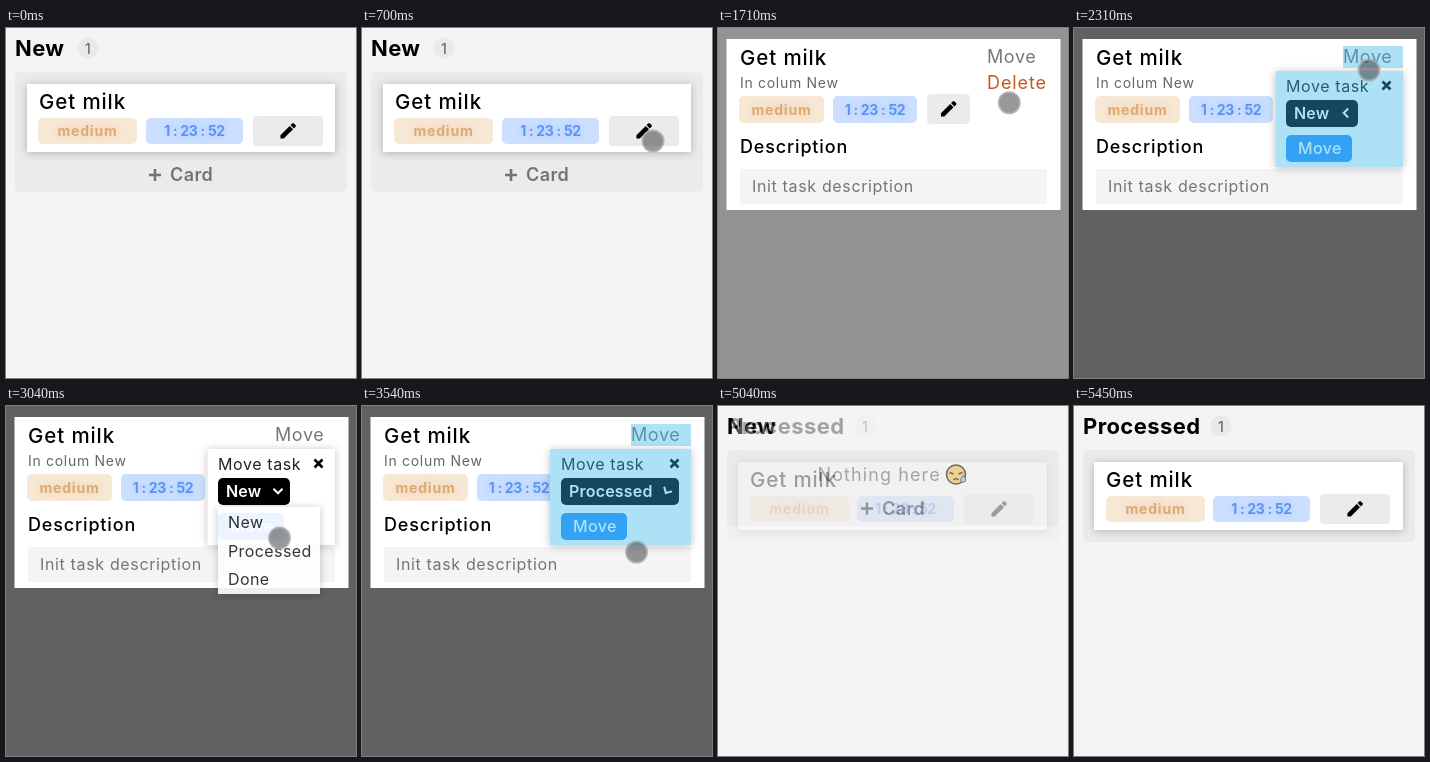
Write an HTML page that moves like this. It is 350 px wide and 350 px high and loops after 6170 ms.

```html
<!DOCTYPE html>
<html lang="en">
<head>
<meta charset="utf-8">
<title>Task board</title>
<style>
  html, body { margin: 0; height: 100%; overflow: hidden; background: #f4f4f4; }
  svg { display: block; width: 100vw; height: 100vh; font-family: Inter, sans-serif; }
  .raised { filter: drop-shadow(0 1px 4px rgba(0, 0, 0, .25)); }
  .glow { filter: drop-shadow(0 0 4px currentColor); }
</style>
</head>
<body>
<svg id="stage" viewBox="0 0 350 350"></svg>
<script>
const LOOP = 6170, STEP = 101, LEAD = 20;
const stage = document.getElementById('stage');
const TAP = 'rgba(51,181,229,.4)';

// Pointer path: step, x, y
const pointerPath = [
  [2, 301, 305], [5, 297, 150], [7, 291, 113], [13, 291, 113], [15, 290.5, 102.5],
  [19, 292, 47], [20, 298, 36], [21, 295, 42], [23, 295, 42], [28, 250, 86],
  [29, 256, 98], [30, 273.5, 132], [32, 274.5, 146], [35, 274.5, 146],
  [38, 240, 122], [40, 238, 122], [42, 249.5, 183.5]
];

const clamp = v => Math.max(0, Math.min(1, v));
const ramp = (k, from, to) => clamp((k - from) / (to - from));

const rect = (x, y, w, h, fill, r = 0, cls = '') =>
  `<rect x="${x}" y="${y}" width="${w}" height="${h}" rx="${r}" fill="${fill}" class="${cls}"/>`;
const text = (x, y, str, size, weight = 500, fill = '#000', spacing = 0, extra = '') =>
  `<text x="${x}" y="${y}" font-size="${size}" font-weight="${weight}" fill="${fill}"
    letter-spacing="${spacing}" ${extra}>${str}</text>`;
const line = (d, color, width, extra = '') =>
  `<path d="${d}" fill="none" stroke="${color}" stroke-width="${width}" ${extra}/>`;
const group = (body, attrs) => `<g ${attrs}>${body}</g>`;

const pill = (x, y, w, h, str, bg, ink, spacing) =>
  rect(x, y, w, h, bg, 5) +
  text(x + w / 2, y + h / 2 + 5, str, 14, 700, ink, spacing,
    `text-anchor="middle" class="glow" style="color:${ink}66"`);

const pencil = (x, y) => group(
  '<path d="M3 21v-4L14 6l4 4L7 21zM15 5l2-2q1-1 2 0l2 2q1 1 0 2l-2 2z"/>',
  `transform="translate(${x} ${y}) scale(.84) translate(-12 -12)"`);

const badges = (x1, w1, x2, w2, x3, w3, y, h) =>
  pill(x1, y, w1, h, 'medium', '#f7e7d5', '#dfa970', .8) +
  pill(x2, y, w2, h, '1 : 23 : 52', '#ccdfff', '#5a94f5', -.3) +
  rect(x3, y - 2, w3, 30, '#ebebeb', 4) + pencil(x3 + w3 / 2, y + 13);

const taskName = (x, y) => text(x, y, 'Get milk', 20.5, 500, '#000', .9);

const heading = (name, badgeX) => text(9, 28, name, 22, 700, '#000', .4) + (badgeX
  ? `<circle cx="${badgeX}" cy="20" r="10.5" fill="#e9e9e9"/>` +
    text(badgeX, 25.5, 1, 14, 500, '#706a70', 0, 'text-anchor="middle"')
  : '');

const panel = h => rect(9, 44, 332, h, '#ebebeb', 5);
const card = x => rect(x, 56, 329 - x, 68, '#fff', 0, 'raised') + taskName(x + 12, 81) +
  badges(32, 99, x + 119, 97, x + 226, 70, 90, 26);
const addCard = y => line(`M143 ${y}h12m-6-6v12`, '#7a716e', 2.6) +
  text(164, y + 6, 'Card', 18, 600, '#7a716e', .4);

const sleepyFace = `
  <circle cx="238" cy="68.500" r="9.500" fill="#e6b95a" stroke="#222" stroke-width="1.600"/>
  <path d="M231.500 66.500l4 1.500m5 0l4-1.500M235.500 74q2.500-3 5 0" fill="none" stroke="#222" stroke-width="1.400"/>
  <path d="M245 69.500q-3.500 4-2 6t4.500 0q1.500-2.500-2.500-6z" fill="#82c3e5" stroke="#222" stroke-width=".8"/>`;

const fullBoard = () => heading('New', 82) + panel(120) + card(21) + addCard(147);
const emptyBoard = () => heading('New') + panel(76) +
  text(99.5, 75, 'Nothing here', 18, 400, '#777', 1.1) + sleepyFace + addCard(102.5);
const processedBoard = () => rect(0, 0, 350, 350, '#f4f4f4') +
  heading('Processed', 147) + panel(92) + card(20);

const modal = () => rect(8.5, 11, 334, 171, '#fff') + taskName(22, 37) +
  text(22, 60, 'In colum New', 14, 400, '#666', .7) +
  badges(21, 85, 115, 84, 209, 43, 68, 27) +
  text(22, 125, 'Description', 18, 500, '#000', .85) +
  rect(22, 141, 307, 35, '#f4f4f4') +
  text(34, 164, 'Init task description', 16, 400, '#757575', .65) +
  text(269, 35, 'Move', 18, 400, '#777', .6) +
  text(269, 61, 'Delete', 18, 400, '#c8561f', .9);

function popup(k) {
  const chosen = k >= 35;
  const x = chosen ? 188 : 201.5, left = Math.floor(x + 11.5) - 1 + (chosen ? 1 : 0);
  const selectW = chosen ? 118 : 72;
  const angle = chosen ? 30 + 60 * ramp(k, 35, 36) : 90 * (1 - ramp(k, 28, 30));
  const tap = chosen ? 1 - ramp(k, 35, 37) : 1 - ramp(k, 24, 26);
  return rect(x, 43, 329 - x, 96, '#fff', 0, 'raised') +
    text(left, 64, 'Move task', 16, 400, '#222', .6) +
    line('M308.500 53.500l8 8m0-8l-8 8', '#000', 2.6) +
    rect(left, 72, selectW, 27, '#000', 5) +
    text(left + 8, 91, chosen ? 'Processed' : 'New', 16, 600, '#fff', .2) +
    line('M-4.500-2.200L0 2.300L4.500-2.200', '#fff', 2,
      `transform="translate(${left + selectW - 12} 85) rotate(${angle})"`) +
    rect(left, 107, 66, 27, '#3396ff', 5) +
    text(left + 12, 126, 'Move', 16, 500, '#fff', .4) +
    group(rect(269, 18, 60, 22, TAP) + rect(x, 43, 329 - x, 96, TAP), `opacity="${tap}"`);
}

const dropdown = k => group(
  rect(212, 101, 102, 87, '#fff', 0, 'raised') +
  ['New', 'Processed', 'Done'].map((name, i) =>
    text(222, 122 + i * 28.5, name, 16, 400, '#222', .4)).join(''),
  `opacity="${[.45, .9][k - 29] || 1}"`);

function pointer(k) {
  const i = pointerPath.findIndex(p => p[0] >= k);
  if (k < 2 || i < 0) return '';
  const [k1, x1, y1] = pointerPath[i], [k0, x0, y0] = pointerPath[Math.max(0, i - 1)];
  const f = k1 > k0 ? (k - k0) / (k1 - k0) : 1;
  return `<circle cx="${x0 + (x1 - x0) * f}" cy="${y0 + (y1 - y0) * f}" r="10.5"
    fill="rgba(40,40,45,.48)" stroke="rgba(170,170,170,.8)" stroke-width="2"/>`;
}

function scene(k) {
  if (k < 13) return fullBoard();
  if (k >= 40) {
    const fade = ramp(k, 48, 54);
    return emptyBoard() + (fade ? group(processedBoard(), `opacity="${fade}"`) : '');
  }
  const dim = .6 * ramp(k, 13, 19);
  return rect(0, 0, 350, 350, `rgba(0,0,0,${dim})`) + modal() +
    (k >= 23 ? popup(k) : '') + (k >= 29 && k < 35 ? dropdown(k) : '');
}

let shown = -1;
function draw(now) {
  const k = Math.floor((now % LOOP + LEAD) / STEP);
  if (k !== shown) {
    shown = k;
    stage.innerHTML = scene(k) + pointer(k);
  }
  requestAnimationFrame(draw);
}
draw(performance.now());
</script>
</body>
</html>
```
